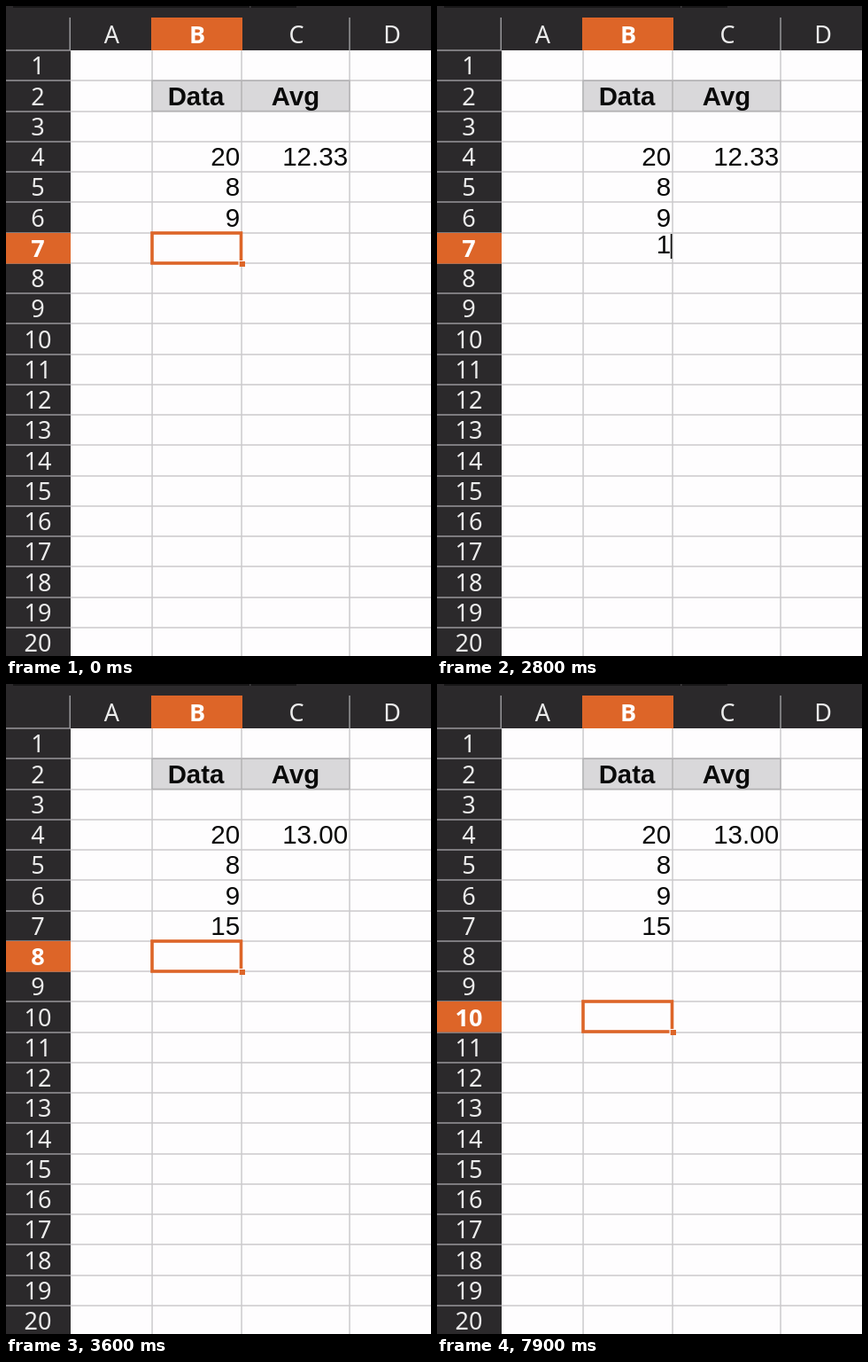
Animation of 480x733 px, one loop 8000 ms. Source, as an HTML page:

```html
<!DOCTYPE html>
<html lang="en">
<head>
<meta charset="utf-8">
<title>Spreadsheet average</title>
<style>
  html, body { margin: 0; width: 100%; height: 100%; overflow: hidden; background: #2b292b; }
  svg { display: block; width: 100%; height: 100%; }
  text { text-anchor: middle; }
  .head { font: 27px "Noto Sans", "Open Sans", sans-serif; fill: #ececec; }
  .head.on { font-weight: 700; fill: #fff; }
  .cell { font: 29.6px "Liberation Sans", Arial, sans-serif; fill: #0a0a0a; text-anchor: end; }
  .title { font: 700 29.4px "Liberation Sans", Arial, sans-serif; fill: #0a0a0a; }
</style>
</head>
<body>
<svg id="sheet" viewBox="0 0 480 733"></svg>
<script>
const LOOP = 8000, ROWS = 20, ORANGE = '#dd6528';
const sheet = document.getElementById('sheet');
const columns = [['A', 119.5], ['B', 216], ['C', 328], ['D', 436]];

// Each state holds until the next one starts.
const states = [
  { at: 0, row: 7, avg: '12.33', entry: '' },
  { at: 2800, row: 7, avg: '12.33', entry: '1', editing: true },
  { at: 2900, row: 7, avg: '12.33', entry: '15', editing: true },
  { at: 3500, row: 8, avg: '13.00', entry: '15' },
  { at: 6600, row: 9, avg: '13.00', entry: '15' },
  { at: 6700, row: 10, avg: '13.00', entry: '15' }
];

const rowTop = row => 50 + (row - 1) * 34.25;
const baseline = row => rowTop(row) + 27.4;
const edge = row => Math.round(rowTop(row)) - 0.75;
const rect = (x, y, w, h, fill, extra = '') =>
  `<rect x="${x}" y="${y}" width="${w}" height="${h}" fill="${fill}" ${extra}/>`;
const text = (value, x, y, kind) => `<text class="${kind}" x="${x}" y="${y}">${value}</text>`;

function drawGrid() {
  let out = rect(0, 0, 480, 733, '#2b292b') + rect(8, 0, 320, 2, '#171617') +
    rect(275, 0, 1.5, 2, '#403e40') + rect(73, 50, 407, 683, '#fefdfe');
  for (let row = 1; row <= ROWS; row++) {
    out += rect(0, edge(row), 73, 1.5, '#98979a');
    if (row > 1) out += rect(73, edge(row), 407, 1.5, '#cbcacc');
  }
  for (const x of [164.3, 265.3, 387.3]) out += rect(x, 50, 1.5, 683, '#cbcacc');
  for (const x of [71.5, 387.3]) out += rect(x, 13, 1.5, 37, '#98979a');
  out += rect(165, 84.2, 223, 34.3, '#d9d8da', 'stroke="#b3b2b4" stroke-width="1.5"');
  return out + rect(265.3, 84, 1.5, 34.5, '#b3b2b4');
}

function drawHeaders(active) {
  let out = rect(164, 13, 103, 37, ORANGE) +
    rect(0, edge(active) + 0.75, 73, 34.5, ORANGE);
  for (const [name, x] of columns) out += text(name, x, 42, name === 'B' ? 'head on' : 'head');
  for (let row = 1; row <= ROWS; row++)
    out += text(row, 36, baseline(row), row === active ? 'head on' : 'head');
  return out;
}

function drawCursor(row) {
  const y = Math.round(rowTop(row));
  return rect(165, y, 100.5, 34, 'none', `stroke="${ORANGE}" stroke-width="3.6"`) +
    rect(262.5, y + 31, 7.5, 7, '#fefdfe') + rect(263.7, y + 32, 6.3, 6, ORANGE);
}

function draw({ row, avg, entry, editing }) {
  let out = drawGrid() + drawHeaders(row) +
    text('Data', 214.5, 111.5, 'title') + text('Avg', 327, 111.5, 'title');
  [20, 8, 9].forEach((value, i) => out += text(value, 264.2, baseline(4 + i), 'cell'));
  out += text(avg, 386.2, baseline(4), 'cell');
  out += text(entry, 264.2, baseline(7) - (editing ? 4 : 0), 'cell');
  out += editing ? rect(263.8, 257, 1.7, 28, '#0a0a0a') : drawCursor(row);
  sheet.innerHTML = out;
}

let shown;
function tick() {
  const time = performance.now() % LOOP;
  const state = states.findLast(s => s.at <= time);
  if (state !== shown) draw(shown = state);
  requestAnimationFrame(tick);
}
tick();
</script>
</body>
</html>
```
